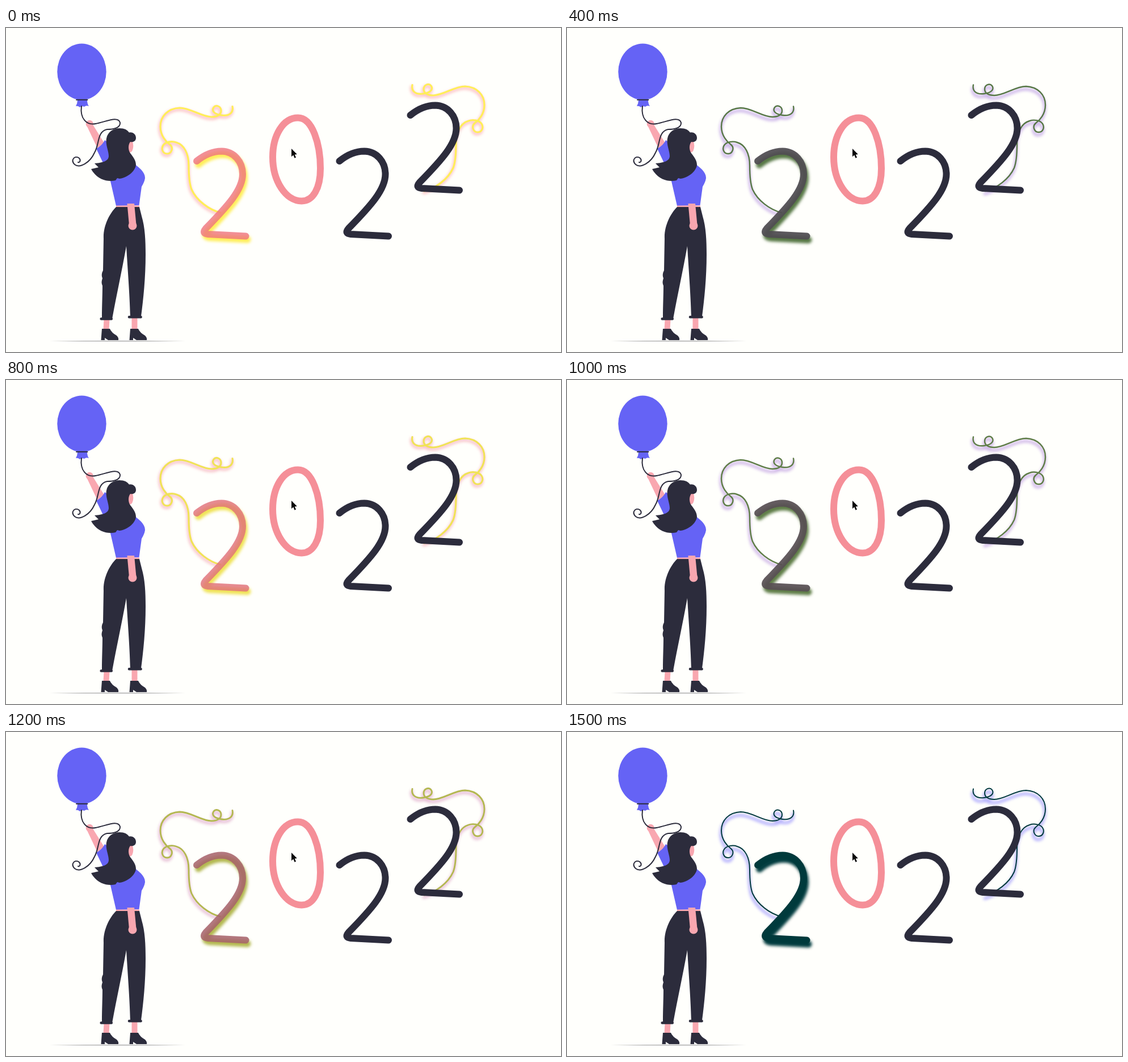
Animation, 978 px wide and 572 px high, one loop 1.7 s. Source, as an HTML page:

```html
<!DOCTYPE html>
<html lang="en">
<head>
<meta charset="utf-8">
<title>2022</title>
<style>
  html, body { margin: 0; width: 100%; height: 100%; overflow: hidden; background: #fffffc; }
  svg { display: block; width: 978px; height: 572px; }
  .dark { fill: #2c2c3c; }
  .blue { fill: #6563f5; }
  .skin { fill: #f9a7b0; }
  .line { fill: none; stroke-linecap: round; stroke-linejoin: round; }
  .digit { stroke-width: 12; }
</style>
</head>
<body>
<svg viewBox="0 0 978 572">
  <defs>
    <path id="two" d="M336 235 C352 222 366 217.5 380 217.5 C402 218 417 236 417 258 C417 285 392 313 352 354 C347 360 348 363 356 364 L422.5 367.5"/>
    <path id="ribbon" d="M399 138.500 C401 148 395 156 380 154 C366 152 362 146 366 140 C370 135 379 138 379 146 C379 153 372 157 362 157 C345 157 325 141 306 141 C285 142 272 156 272 174 C272 190 282 201 289 206 C296 212 291 222 284 222 C276 222 273 213 277 207 C281 201 292 199 300 202 C314 206 322 222 322 243 C322 255 322 272 327 285 C336 305 358 321 378 326"/>
    <g id="ribbons">
      <use href="#ribbon"/>
      <use href="#ribbon" transform="translate(1115 -38) scale(-1 1)"/>
    </g>
    <path id="boot" d="M167.500 551 L169 531 L183 531 Q186 538 195 543 Q199 547 198 551 L180 551 L174 547 V551 Z"/>
    <filter id="soft" filterUnits="userSpaceOnUse" x="240" y="70" width="640" height="340">
      <feGaussianBlur stdDeviation="2.6"/>
    </filter>
  </defs>

  <rect width="978" height="572" fill="#fffffc"/>
  <path d="M77 552.700 Q196 550.200 316 552.700 Q196 555.200 77 552.700 Z" fill="#c8c8c8"/>

  <!-- woman -->
  <path class="skin" d="M143 174 L152 169 L173 203 L161 212 Z"/>
  <circle class="skin" cx="147.300" cy="169.300" r="6.600"/>
  <path class="blue" d="M159 213 Q170 207 174 198 L200 215 L230 243 Q245 254 245 265 Q244 272 239 280 L234.500 313 L194 314 L183 266 L170 236 Z"/>
  <ellipse class="skin" cx="218.500" cy="208" rx="5.800" ry="11.500"/>
  <path class="dark" d="M200 177 C209 177 214 180 217 184.500 C224 183 229 188 229 194 C229 200 224 202 219 201 C215 206 215 215 219 221 C225 229 229 234 229 242 C228 252 215 264 200 266 L196 265 L193 269 C180 272 161 269 150 249 L163 246 L156 239 C170 238 181 235 181 226 C181 217 175 206 177 195 C179 183 190 177 200 177 Z"/>
  <path class="skin" d="M194 313.600 H235 V316 H194 Z"/>
  <path class="dark" d="M194 316 H235 L239 332 C245 352 246 375 246 400 C246 440 242 480 238 509 L219 510 C218 470 214 420 212 385 C204 430 194 475 187 514 H169 C169 490 170 473 170 455 Q167 449 170 442 Q167 435 171 428 L172 372 C171 350 182 328 194 316 Z"/>
  <path class="skin" d="M213.500 310 H226 L229.500 347 L217 348 Z"/>
  <circle class="skin" cx="223" cy="349" r="7.500"/>
  <path class="skin" d="M172.500 515 H182.500 L181.500 532 H171.500 Z M221.500 512 H231.500 V532 H221.500 Z"/>
  <rect class="dark" x="165.500" y="511.300" width="22.500" height="4.500" rx="2"/>
  <rect class="dark" x="214.800" y="508" width="25" height="4.500" rx="2"/>
  <use href="#boot" class="dark"/>
  <use href="#boot" class="dark" x="50"/>

  <!-- balloon -->
  <path class="blue" d="M126 127 H143 Q143 134 146 138 Q141 136 138 139 Q134 137 130 140 Q127 137 123 138 Q126 133 126 127 Z"/>
  <ellipse class="blue" cx="133.500" cy="77.200" rx="43.200" ry="49.800"/>
  <path class="line" d="M124 126.800 H143.500" stroke="#2c2c3c" stroke-width="2"/>
  <path class="line" d="M133 138 C130 160 142 172 158 169 C178 165 197 155 201 167 C202 177 188 179 178 179 C160 183 165 205 156 220 C148 238 130 248 121 241 C113 233 121 225 128 229 C133 233 130 238 127 237" stroke="#2c2c3c" stroke-width="2"/>

  <!-- year -->
  <g class="line">
    <use id="haze" href="#ribbons" filter="url(#soft)" opacity=".5" stroke-width="5"/>
    <use id="glow" href="#two" class="digit" filter="url(#soft)"/>
    <use id="thread" href="#ribbons"/>
    <use id="lit" href="#two" class="digit"/>
    <path class="digit" stroke="#f58f98" d="M514.500 158.500 C488 158.500 470 190 470 228 C470 270 493 305.500 521 305.500 C541 305.500 554 283 554 248 C554 205 540 158.500 514.500 158.500 Z"/>
    <use href="#two" class="digit" stroke="#2c2c3c" x="251.500"/>
    <use href="#two" class="digit" stroke="#2c2c3c" x="376.500" y="-81"/>
  </g>

  <path d="M503 213 V227.200 L506.200 224.300 L508.600 229.700 L511 228.600 L508.700 223.400 L512.800 223 Z" fill="#080808" stroke="#fff" stroke-width=".8" paint-order="stroke"/>
</svg>
<script>
  const LOOP = 1700, STEP = 100;
  const haze = document.getElementById("haze");
  const glow = document.getElementById("glow");
  const thread = document.getElementById("thread");
  const lit = document.getElementById("lit");

  // [time, brightness]; the loop opens bright and jumps down at 300 ms
  const keys = [[300, .27], [600, .47], [800, .94], [1000, .37], [1200, .7], [1500, 0]];

  const lerp = (a, b, t) => a + (b - a) * t;
  const mix = (a, b, t) => `rgb(${a.map((v, i) => Math.round(lerp(v, b[i], t)))})`;

  function brightness(time) {
    if (time < 300) return 1;
    const next = keys.findIndex(key => key[0] > time);
    if (next < 0) return 0;
    const [t0, a] = keys[next - 1], [t1, b] = keys[next];
    return lerp(a, b, (time - t0) / (t1 - t0));
  }

  function draw(ms) {
    const p = brightness(Math.floor(ms % LOOP / STEP) * STEP);
    const color = mix([0, 58, 60], [255, 238, 88], p);
    thread.setAttribute("stroke", color);
    thread.setAttribute("stroke-width", lerp(2, 3.2, p));
    glow.setAttribute("stroke", color);
    glow.setAttribute("transform", `translate(3 ${lerp(7, 6, p)})`);
    lit.setAttribute("stroke", mix([0, 58, 60], [239, 115, 125], p));
    lit.setAttribute("stroke-opacity", lerp(1, .8, p));
    haze.setAttribute("stroke", mix([108, 99, 255], [248, 130, 140], p));
    haze.setAttribute("transform", `translate(-1 ${lerp(6, 3, p)})`);
  }

  const start = performance.now();
  function tick() {
    draw(performance.now() - start);
    requestAnimationFrame(tick);
  }
  tick();
</script>
</body>
</html>
```
